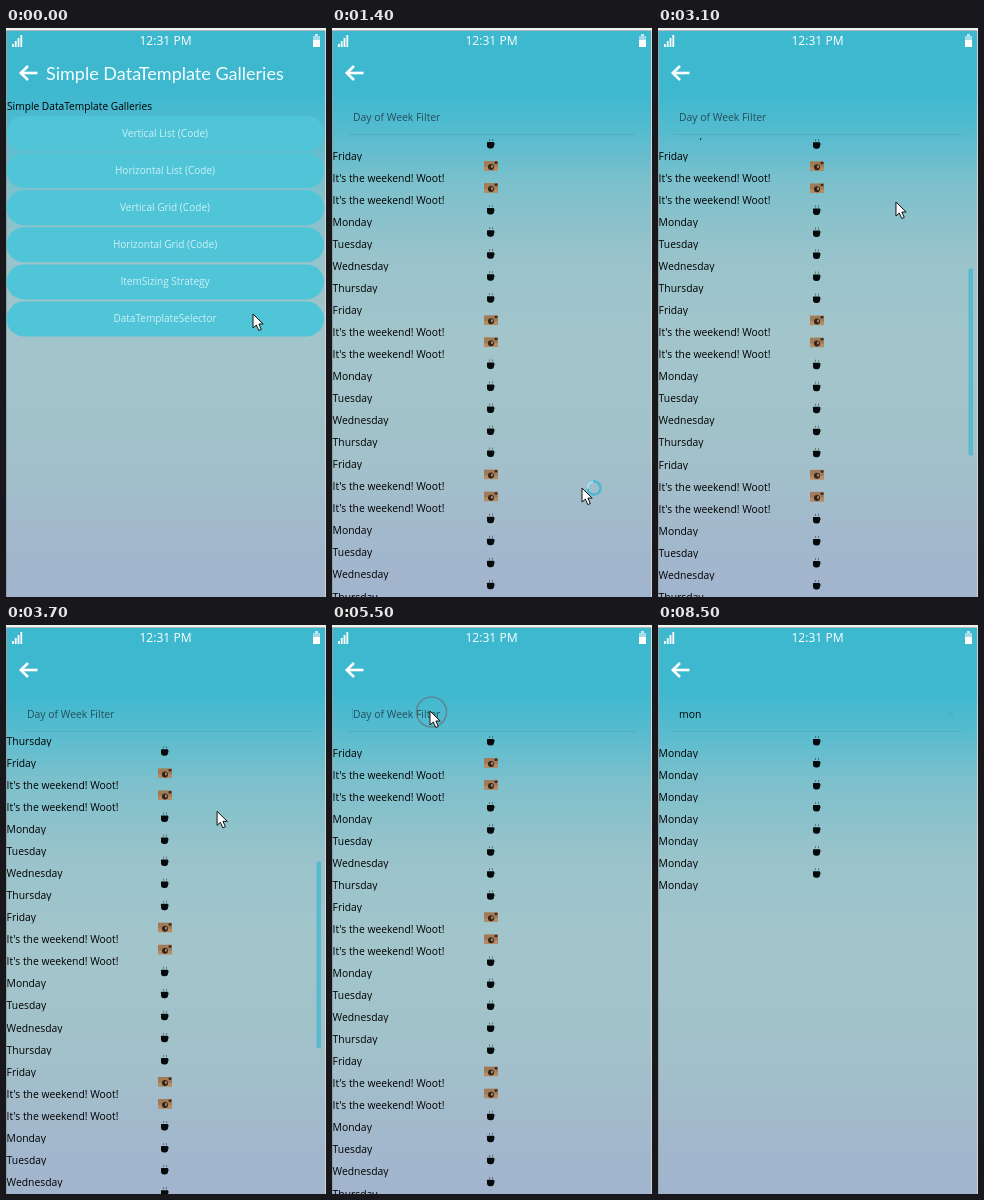
An HTML page with a canvas that plays this animation: 320x569 px, repeating every 8.6 s.

```html
<!DOCTYPE html>
<html lang="en">
<head>
<meta charset="utf-8">
<title>Template galleries</title>
<style>
html, body { margin: 0; width: 100%; height: 100%; overflow: hidden; background: #f2f2f2; }
canvas { display: block; }
</style>
</head>
<body>
<canvas id="stage" width="320" height="569"></canvas>
<script>
const ctx = document.getElementById('stage').getContext('2d');
const LOOP = 8600, PITCH = 22.04, ROWS = 50, LIST_TOP = 110;
const SANS = '"Open Sans", "Noto Sans", sans-serif';
const BUTTONS = ['Vertical List (Code)', 'Horizontal List (Code)', 'Vertical Grid (Code)',
  'Horizontal Grid (Code)', 'ItemSizing Strategy', 'DataTemplateSelector'];
const WEEKEND = "It's the weekend! Woot!";
const DAYS = ['Friday', WEEKEND, WEEKEND, 'Monday', 'Tuesday', 'Wednesday', 'Thursday'];

const ALL = Array.from({ length: ROWS }, (_, i) => DAYS[i % 7]);
const MONDAYS = ALL.filter(day => day === 'Monday');

// Keys are [time, value...]
const POINTER = [[0, 247, 286], [600, 247, 286], [800, 248, 330], [1400, 250, 460], [1700, 252, 490],
  [2300, 254, 313], [3100, 238, 174], [3600, 215, 175], [4400, 184, 265], [4900, 160, 400],
  [5400, 98, 86], [6300, 98, 86]];
const SCROLL = [[1700, 0], [2300, 180.3], [3100, 308.3], [3600, 308.3], [4400, 228.4], [5000, 0]];
const BAR = [[1650, 0], [1800, 1], [5000, 1], [5400, 0]];

function at(keys, t) {
  if (t <= keys[0][0]) return keys[0].slice(1);
  const i = keys.findIndex(key => key[0] > t);
  if (i < 0) return keys[keys.length - 1].slice(1);
  const a = keys[i - 1], b = keys[i], k = (t - a[0]) / (b[0] - a[0]);
  return a.slice(1).map((v, j) => v + (b[j + 1] - v) * k);
}

function text(str, x, y, size, color, font = SANS, align = 'left') {
  ctx.font = `${size}px ${font}`;
  ctx.fillStyle = color;
  ctx.textAlign = align;
  ctx.fillText(str, x, y);
}

function box(x, y, w, h, color) {
  ctx.fillStyle = color;
  ctx.fillRect(x, y, w, h);
}

function pill(x, y, w, h, r, color) {
  ctx.beginPath();
  ctx.roundRect(x, y, w, h, r);
  ctx.fillStyle = color;
  ctx.fill();
}

function line(points, color, width) {
  ctx.beginPath();
  points.forEach(p => ctx.lineTo(...p));
  ctx.strokeStyle = color;
  ctx.lineWidth = width;
  ctx.stroke();
}

function ring(x, y, r, color, width, from = 0, to = 7) {
  ctx.beginPath();
  ctx.arc(x, y, r, from, to);
  ctx.strokeStyle = color;
  ctx.lineWidth = width;
  ctx.stroke();
}

function clipped(x, y, w, h, paint) {
  ctx.save();
  ctx.beginPath();
  ctx.rect(x, y, w, h);
  ctx.clip();
  paint();
  ctx.restore();
}

function frame() {
  box(0, 0, 320, 569, '#f0f1f1');
  const sky = ctx.createLinearGradient(0, 3, 0, 569);
  [[0, '#3cb8cf'], [.11, '#3eb8cf'], [.17, '#52bbcf'], [.27, '#7cc0cc'], [.4, '#99c3cb'],
    [.55, '#a2c5cb'], [.75, '#a2c1ca'], [.88, '#a2b9cc'], [1, '#a2b4ce']]
    .forEach(stop => sky.addColorStop(...stop));
  box(0, 3, 319, 566, sky);
  box(0, 2, 319, 1, '#b5b8ba');
  box(0, 3, 1, 566, '#94a2a8');
  box(319, 3, 1, 566, '#d6d4d5');

  for (let i = 0; i < 4; i++) box(6 + i * 2.8, 16 - i * 3, 1.8, 3 + i * 3, '#fff');
  text('12:31 PM', 159.5, 17, 12.1, '#fff', SANS, 'center');
  box(309, 6, 3, 2, '#c5e9f0');
  box(307, 8, 7, 4, '#a5dce8');
  box(307, 12, 7, 7, '#fff');

  line([[15, 45], [31.5, 45]], '#fff', 2.6);
  line([[22, 38], [14.8, 45], [22, 52]], '#fff', 2.6);
}

function gallery() {
  text('Simple DataTemplate Galleries', 40, 51.8, 18.05, '#f4fcfd', 'Lato, sans-serif');
  text('Simple DataTemplate Galleries', 1, 81.5, 10.2, '#000');
  BUTTONS.forEach((label, i) => {
    const y = 88 + i * 37.1;
    pill(0.5, y, 317.5, 35, 17.5, '#50c5d8');
    text(label, 159, y + 20.5, 10.05, '#ccf0f6', SANS, 'center');
  });
}

function cup(y) {
  box(157, y - 5, 1, 2, 'rgba(0,0,0,.4)');
  box(160, y - 5, 1, 2, 'rgba(0,0,0,.4)');
  pill(155, y - 2, 7, 6.5, [0.5, 0.5, 3, 3], '#05090a');
  ring(161.5, y, 1.2, '#0c1a1d', 0.5);
}

function photo(y) {
  box(152, y - 5, 14, 9.5, '#a27b56');
  box(152, y + 1, 14, 3.5, '#b58c63');
  pill(156, y - 2, 6, 6, 3, '#30231c');
  pill(159, y - 1, 2, 3, 1, '#a88464');
  pill(162.5, y - 4.5, 3, 2.5, 1, '#3a2c25');
}

// Each row trims the descenders of its label
function row(label, y) {
  clipped(0, y - 6, 318, 23.5, () => {
    (label === WEEKEND ? photo : cup)(y);
    text(label, 0.6, y + 15.7, 10.35, '#000');
  });
}

function list(rows, scroll) {
  clipped(0, LIST_TOP, 318, 569 - LIST_TOP, () =>
    rows.forEach((label, i) => row(label, 116 + i * PITCH - scroll)));
}

function selector(t) {
  const typed = 'mon'.slice(0, t < 6400 ? 0 : t < 6600 ? 1 : t < 6900 ? 2 : 3);
  text(typed || 'Day of Week Filter', 21, 93, 10.4, typed ? '#000' : '#264f5b');
  box(16, 106, 288, 1, 'rgba(40,120,145,.2)');
  if (t >= 5500 && !typed) box(20, 83, 1, 12, '#35a5c4');
  if (typed) {
    line([[289, 86], [296, 93]], '#48adc4', 1);
    line([[296, 86], [289, 93]], '#48adc4', 1);
  }
  const [scroll] = at(SCROLL, t);
  list(typed ? MONDAYS : ALL, scroll);
  ctx.globalAlpha = at(BAR, t)[0];
  pill(310.5, 108 + scroll * .43, 4.5, 187, 1.5, '#5ab9cd');
  ctx.globalAlpha = 1;
}

function pointer(t) {
  if (t >= 6300) return;
  const [x, y] = at(POINTER, t);
  if ((t >= 400 && t < 600) || (t >= 5450 && t < 5700)) ring(x + 1.5, y + 1, 15, 'rgba(105,110,115,.65)', 1.5);
  if (t >= 800 && t < 1600) {
    const a = t / 150;
    ring(x + 12, y, 6.5, '#49b9d4', 2.5);
    ring(x + 12, y, 6.5, '#b5e4ee', 2, a, a + 1.5);
  }
  ctx.beginPath();
  [[0, 0], [0, 14], [3.3, 11], [5.8, 16.5], [8.3, 15.4], [5.9, 10], [10.2, 10]]
    .forEach(([dx, dy]) => ctx.lineTo(x + dx, y + dy));
  ctx.closePath();
  ctx.fillStyle = '#fff';
  ctx.fill();
  ctx.strokeStyle = '#111';
  ctx.lineWidth = 1;
  ctx.stroke();
}

function draw(now) {
  const t = now % LOOP;
  frame();
  (t < 800 ? gallery : selector)(t);
  pointer(t);
  requestAnimationFrame(draw);
}
draw(performance.now());
</script>
</body>
</html>
```
